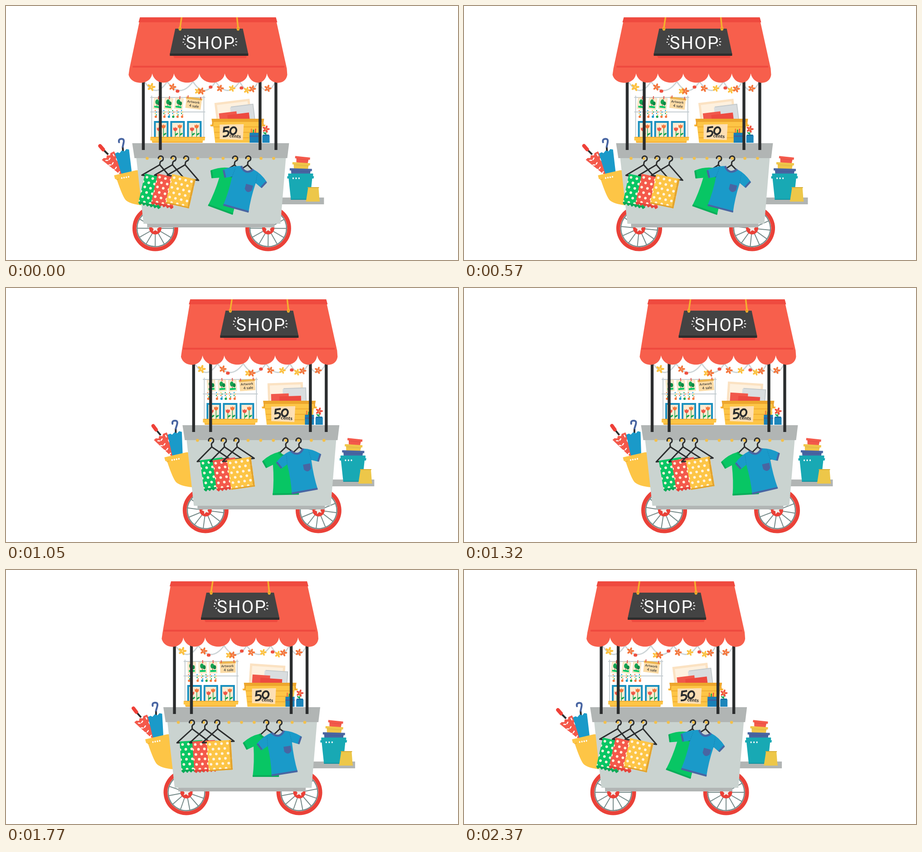
An HTML page with a canvas for the animation above (2.4 s loop, 997 px wide and 561 px high).

```html
<!DOCTYPE html>
<html lang="en">
<head>
<meta charset="utf-8">
<title>Shop cart</title>
<style>
html, body { margin: 0; width: 100%; height: 100%; overflow: hidden; background: #fff; }
canvas { display: block; width: 997px; height: 561px; }
</style>
</head>
<body>
<canvas id="stage" width="997" height="561"></canvas>
<script>
const ctx = document.getElementById('stage').getContext('2d');
const LOOP = 2400, STEP = 30, TAU = Math.PI * 2, DEG = Math.PI / 180;
const C = {
  roof: '#f75f4c', roofDark: '#ef4a3f', black: '#2b2d2e', grey: '#b1b5b4', body: '#cad3d0',
  yellow: '#fdc546', amber: '#eda62d', blue: '#1a9ac9', navy: '#4865a2', green: '#08c664',
  leaf: '#14a452', orange: '#f4763c', cream: '#fdecd3', wheel: '#ea4138', spoke: '#768a89', teal: '#18a9b4'
};

// Cubic ease in and out, centred on a moment.
function ease(t, centre, span) {
  const u = Math.min(1, Math.max(0, (t - centre) / span + 0.5));
  return u < 0.5 ? 4 * u ** 3 : 1 - 4 * (1 - u) ** 3;
}
const sway = (t, out, back, span) => ease(t, out, span) - ease(t, back, span);
const mix = (a, b, k) => a + (b - a) * k;

function trace(points, closed = true) {
  ctx.beginPath();
  for (let i = 0; i < points.length; i += 2) ctx.lineTo(points[i], points[i + 1]);
  if (closed) ctx.closePath();
}
function poly(color, ...points) {
  trace(points);
  ctx.fillStyle = color;
  ctx.fill();
}
function line(color, width, ...points) {
  trace(points, false);
  ctx.strokeStyle = color;
  ctx.lineWidth = width;
  ctx.stroke();
}
function path(d, fill, stroke, width) {
  const p = new Path2D(d);
  if (fill) { ctx.fillStyle = fill; ctx.fill(p); }
  if (stroke) { ctx.strokeStyle = stroke; ctx.lineWidth = width; ctx.stroke(p); }
}
function rect(color, x, y, w, h) {
  ctx.fillStyle = color;
  ctx.fillRect(x, y, w, h);
}
function oval(color, x, y, rx, ry = rx, turn = 0) {
  ctx.fillStyle = color;
  ctx.beginPath();
  ctx.ellipse(x, y, rx, ry, turn, 0, TAU);
  ctx.fill();
}
function ring(color, width, x, y, r) {
  ctx.strokeStyle = color;
  ctx.lineWidth = width;
  ctx.beginPath();
  ctx.arc(x, y, r, 0, TAU);
  ctx.stroke();
}
function text(str, x, y, font, color, spacing = 0) {
  ctx.font = font;
  ctx.fillStyle = color;
  ctx.letterSpacing = spacing + 'px';
  ctx.fillText(str, x, y);
}
function at(x, y, degrees, draw) {
  ctx.save();
  ctx.translate(x, y);
  ctx.rotate(degrees * DEG);
  draw();
  ctx.restore();
}

function blossom(color, x, y, r) {
  for (let i = 0; i < 5; i++) {
    const a = i * TAU / 5 - 1.3;
    oval(color, x + Math.cos(a) * r * 0.6, y + Math.sin(a) * r * 0.6, r * 0.5, r * 0.28, a);
  }
}

function garland() {
  const knots = [305, 355, 412, 462, 515, 556, 594];
  ctx.beginPath();
  ctx.moveTo(knots[0], 167);
  knots.slice(1).forEach((x, i) => ctx.quadraticCurveTo((x + knots[i]) / 2, 206, x, 167));
  ctx.strokeStyle = '#ccd4d6';
  ctx.lineWidth = 2.8;
  ctx.stroke();
  for (const [x, y] of [[378, 188], [451, 179], [519, 181]]) oval('#ef5040', x, y, 4.2, 3.5);
  for (const [x, y] of [[320, 179], [423, 188], [498, 182], [531, 186]]) blossom('#fdc13f', x, y, x % 3 ? 8.5 : 7);
  for (const [x, y] of [[367, 179], [431, 188], [472, 182], [543, 183], [577, 182]]) blossom(C.orange, x, y, 7.5);
}

function artCard(x, turn) {
  at(x, 203, turn, () => {
    rect('#f7dfb4', -8.5, 0, 18, 25);
    rect(C.cream, -7, 1.5, 15, 22);
    oval(C.leaf, -1, 9, 4, 5.5);
    oval('#0c8a45', 4, 12, 3.2, 4.5);
    rect('#6b5434', -1, 13, 1.2, 6);
    rect(C.green, -6, 18, 13, 4);
    line('#e4574b', 2, 1, -4, 1, 3);
  });
}

function tulip(color, x, y) {
  line(C.leaf, 1.4, x, y, x, 289);
  path(`M${x - 4.5} ${y - 5}l2.5 2 2-3 2 3 2.5-2v5q-4.5 7-9 0z`, color);
  oval(C.leaf, x + 3, 283, 3.8, 1.7, -0.6);
}

function rack(tilt) {
  const bar = '#c4ccd0';
  for (const x of [321, 436]) line(bar, 2, x, 198, x, 292);
  for (const y of [202, 234]) line(bar, 2, 318, y, 439, y);
  [335, 359, 382].forEach(x => artCard(x, tilt));
  at(414, 202, tilt, () => {
    rect('#fbdba5', -16, 1, 34, 24);
    rect('#edb650', -17, 0, 36, 4.5);
    line('#e4574b', 2, -13, -3, -13, 3);
    line('#e4574b', 2, 15, -3, 15, 3);
    text('Artwork', -13.5, 12.5, '600 7.2px Lato, sans-serif', C.black, 0.2);
    text('4 sale', -8, 21.5, '600 8px Lato, sans-serif', C.black, 0.2);
  });
  const beads = [C.orange, C.blue, C.yellow, C.leaf];
  [330, 349, 359, 368.5, 378, 388].forEach((x, i) => {
    for (let j = 0; j < 4; j++) oval(beads[(i + j) % 4], x + (j % 2 ? 1.2 : -1.2), 231 + j * 3.2, 1.3);
    oval([C.orange, C.orange, C.blue, C.leaf][i % 4], x, 244.5, 2.6);
  });
  for (const x of [326, 362, 399]) {
    rect('#1990bf', x, 254, 32, 38);
    rect(C.cream, x + 4, 258, 24, 34);
    tulip('#ef5646', x + 11, 273);
    tulip(C.orange, x + 21, 267);
  }
  poly(C.yellow, 318, 289, 439, 289, 438, 297, 434, 297, 433, 302, 322, 302, 321, 297, 318, 297);
  rect(C.amber, 320, 289, 118, 1.5);
  rect(C.amber, 323, 300, 110, 2);
}

function crate(tilt) {
  at(505, 250, tilt, () => {
    rect('#fbe2c2', -41, -41, 78, 48);
    rect('#fef1df', -36, -36, 68, 40);
    rect('#c4cacc', -6, -29, 50, 34);
    rect('#d9dddf', -8, -27, 50, 34);
    rect('#f1584b', -34, -17, 39, 24);
    rect('#ed4a40', -16, -11, 48, 18);
  });
  poly(C.yellow, 455, 250, 567, 250, 560, 302, 461, 302);
  for (let i = 0; i < 3; i++) line(C.amber, 1.4, 457 + i * 2, 267 + i * 12, 564 - i * 2, 267 + i * 12);
  poly(C.amber, 453, 249, 569, 249, 568, 256, 454, 256);
  poly('#fbb93e', 450, 262, 458, 262, 457, 266, 451, 266);
  poly('#fbb93e', 564, 262, 572, 262, 571, 266, 565, 266);
  line(C.amber, 3, 456, 255, 455, 265);
  line(C.amber, 3, 566, 255, 567, 265);
  poly('#fddfb4', 471, 262, 524, 261, 522, 296, 471, 294);
  path('M492 267L481 268.5 480 277Q491 274 490.500 281Q489 289 478 288', null, C.black, 4);
  ctx.beginPath();
  ctx.ellipse(501, 275.500, 6.5, 8, 0.4, 0, TAU);
  ctx.stroke();
  at(492, 290, 4, () => text('cents', 0, 0, '800 10.5px Lato, sans-serif', C.black, 0.1));
}

function pencils() {
  [C.orange, C.leaf, '#ef5040', C.yellow].forEach((c, i) => {
    line(c, 2.5, 541 + i * 4, 284, 541 + i * 4.6, 271 + i % 2 * 2);
  });
  rect('#1a80b7', 537, 280, 20, 22);
  rect('#3d62a0', 537, 286, 20, 3);
}
function vase() {
  line(C.leaf, 1.8, 573, 286, 573, 272);
  oval(C.leaf, 570, 281, 3.5, 1.6, 0.6);
  blossom('#ef5140', 573, 272, 7.5);
  oval(C.yellow, 573, 272, 1.6);
  rect('#1d86bb', 565, 286, 16, 16);
  rect('#176ea5', 566, 284, 14, 3);
}

function wheel(x, roll) {
  at(x, 491, 0, () => {
    ctx.rotate(roll);
    oval('#fff', 0, 0, 46);
    for (let i = 0; i < 12; i++) {
      const a = i * TAU / 12;
      line(C.spoke, 2, 0, 0, Math.cos(a) * 40, Math.sin(a) * 40);
    }
    ring(C.spoke, 2.5, 0, 0, 40.5);
    ring(C.wheel, 8.5, 0, 0, 46.2);
    oval(C.wheel, 0, 0, 13.5);
    const star = [];
    for (let i = 0; i < 10; i++) {
      const r = i % 2 ? 4.2 : 9, a = i * TAU / 10 - TAU / 4;
      star.push(Math.cos(a) * r, Math.sin(a) * r);
    }
    poly('#f3eeea', ...star);
  });
}

function umbrellas(lean) {
  at(265, 385, lean, () => {
    ctx.translate(-265, -385);
    line(C.black, 4, 214, 317, 225, 328);
    ctx.lineCap = 'round';
    line('#ef4038', 8, 207, 309, 214, 317);
    poly('#f4594b', 211, 340, 215, 336, 221, 336, 222, 330, 229, 330, 230, 325, 238, 321, 260, 362, 258, 376, 246, 368);
    for (let i = 0; i < 11; i++) {
      const x = 220 + i % 3 * 9 + Math.floor(i / 3) * 7, y = 341 - i % 3 * 5 + Math.floor(i / 3) * 10;
      const a = i * 2.1;
      if (x < 256) line('#fff', 2.4, x, y, x + Math.cos(a) * 4, y + Math.sin(a) * 4);
    }
    ctx.lineCap = 'butt';
    line(C.black, 4, 257, 311, 258, 324);
    ctx.lineCap = 'round';
    path('M249 301Q247 294 254 293.500Q261 293 259 302L257 311', null, C.navy, 4);
    ctx.lineCap = 'butt';
    poly(C.blue, 240, 326, 246, 323, 250, 325, 255, 319, 261, 321, 265, 316, 271, 317, 278, 376, 256, 376);
  });
}

function sideBasket() {
  path('M238 374L286 363 300 362V440Q274 438 264 429Q257 422 244 383L240 382z', C.yellow);
  line(C.amber, 1.2, 243, 384, 249, 382);
  for (let i = 0; i < 4; i++) oval('#fff', 255 + i * 5, 380 - i * 0.9, 1.5, 2);
}

function bowl(color, x, y, w, turn) {
  at(x, y, turn, () => {
    poly(color, -w / 2, 0, w / 2, 0, w / 2, 5, w / 2 - 3, 5, w / 2 - 4, 14, 4 - w / 2, 14, 3 - w / 2, 5, -w / 2, 5);
    rect('rgba(0,0,0,.07)', 3 - w / 2, 5, w - 6, 1.5);
  });
}
function buckets() {
  bowl('#f4594b', 654, 333, 33, 6);
  bowl('#f0c649', 651, 346, 39, 4);
  bowl(C.navy, 650, 359, 49, 2);
  poly(C.teal, 622, 370, 677, 370, 677, 376, 679, 376, 678, 381, 675, 381, 670, 428, 628, 428, 623, 381, 620, 381, 620, 376, 622, 376);
  rect('#14929f', 628, 426, 42, 2);
  for (let i = 0; i < 3; i++) oval('#fff', 633 + i * 6.5, 380.500, 1.5, 2);
  poly('#edc749', 666, 401, 689, 401, 691, 427, 692, 432, 661, 432, 662, 427);
  rect('#d9ae38', 665, 400, 25, 2);
}

function hanger() {
  ctx.beginPath();
  ctx.arc(0, 0, 5.5, Math.PI, Math.PI * 2.4);
  ctx.lineTo(0, 8);
  ctx.lineTo(0, 14);
  ctx.strokeStyle = C.black;
  ctx.lineWidth = 3;
  ctx.lineJoin = ctx.lineCap = 'round';
  ctx.stroke();
  trace([0, 14, 35, 43, -35, 43]);
  ctx.stroke();
  ctx.lineJoin = 'miter';
  ctx.lineCap = 'butt';
}

function towel(x, color, edge, left, width, jagged, angle) {
  at(x, 337, angle, () => {
    hanger();
    ctx.translate(0, 43);
    ctx.rotate(angle * 0.35 * DEG);
    const right = left + width, outline = [left, -3, right, -3, right, 63];
    if (jagged) for (let i = 0; i <= 12; i++) outline.push(right - i * width / 12, i % 2 ? 67 : 63);
    else outline.push(left, 63);
    ctx.save();
    trace(outline);
    ctx.fillStyle = color;
    ctx.fill();
    ctx.clip();
    for (let row = 0; row < 6; row++) {
      for (let col = 0; col < 6; col++) oval('#fff3dc', left + 6 + col * 13 - row % 2 * 6.5, 4 + row * 11, 2.9);
    }
    rect(edge, left, 60, width, 8);
    if (!jagged) rect(edge, right - 4, -3, 4, 70);
    ctx.restore();
  });
}

function shirt(x, dx, dy, angle, swing, color, trim, pocket) {
  at(x, 337, swing * 0.4, hanger);
  at(x + dx, 337 + dy, angle, () => {
    path('M-14-3Q-33 1-50 16L-42 32-27 25Q-25 60-29 91H29Q25 60 27 25L42 32 50 16Q33 1 14-3Q0 15-14-3z', color);
    path('M-14-3Q0 15 14-3', null, trim, 4.5);
    line(trim, 4, -49, 16, -41, 31);
    line(trim, 4, 49, 16, 41, 31);
    rect(trim, -29, 88, 58, 4);
    if (pocket) {
      path('M7 32H23V43Q15 54 7 43z', trim);
      ctx.setLineDash([2, 2]);
      line('#187fae', 1, -27, 25, -25, 4);
      line('#187fae', 1, 27, 25, 25, 4);
      ctx.setLineDash([]);
    }
  });
}

function roof(tuck) {
  const left = 270 + tuck;
  const cusps = [322, 370, 426, 482, 533, 575, 620];
  ctx.beginPath();
  ctx.moveTo(294, 34);
  ctx.lineTo(596, 34);
  ctx.lineTo(619, 138);
  ctx.lineTo(620, 152);
  let x = 620;
  for (const next of [...cusps.slice(0, -1).reverse(), left]) {
    ctx.bezierCurveTo(x - 3, 176, next + 6, 176, next, next === left ? 152 : 149);
    x = next;
  }
  ctx.lineTo(left + 2, 138);
  ctx.closePath();
  ctx.fillStyle = C.roof;
  ctx.fill();
  poly(C.roofDark, 295, 25, 595, 25, 598, 36, 292, 36);
  rect(C.roofDark, 279, 132, 335, 4);
}

function sign() {
  poly(C.roofDark, 368, 109, 531, 109, 529, 115, 371, 115);
  poly('#434343', 373, 50, 522, 50, 534, 106, 361, 106);
  rect('#2d2d2d', 361, 105, 173, 5);
  for (const [a, b] of [[387, 383.500], [509, 511.500]]) {
    line('#f5b02e', 3.5, a, 25, b, 48);
    oval('#f5b02e', b, 50, 3.2, 4.5);
    oval('#d98e1c', b, 50, 1.2, 2);
  }
  text('SHOP', 396, 95, '400 38.5px Roboto, sans-serif', '#fff', 2.2);
  ctx.lineCap = 'round';
  for (const [x, y, dx, dy] of [[391, 73, 2, 1], [390, 80, 1, 0], [394, 66, 1, 2], [401, 65, 0, 1], [394, 85, 1, -1],
    [506, 73, 1, -1], [507, 79, 2, 0], [506, 85, 2, 1], [501, 87, 1, 1]]) line('#fff', 2.2, x, y, x + dx, y + dy);
  ctx.lineCap = 'butt';
}

function draw(t) {
  const drive = 113 * (ease(t, 566, 1400) - ease(t, 1821, 1270));
  const slide = sway(t, 850, 1930, 900);
  const lag = sway(t, 830, 1860, 900);
  const paper = sway(t, 1060, 2040, 800);
  const cloth = mix(9.5, -7, lag);
  const tilt = mix(15.5, -13, slide);
  const shifted = (dx, fn) => at(dx * slide, 0, 0, fn);

  rect('#fff', 0, 0, 997, 561);
  ctx.save();
  ctx.translate(drive, 0);

  garland();
  shifted(5.5, () => rack(mix(7, -5, lag)));
  shifted(3, () => crate(mix(-7, 4, paper)));
  shifted(12, pencils);
  shifted(7, vase);

  wheel(329, drive / 50);
  wheel(578, drive / 50);
  umbrellas(5 * lag);
  sideBasket();
  rect(C.grey, 600, 423, 101, 15);
  shifted(5, buckets);

  rect(C.grey, 311, 480, 281, 9);
  poly(C.body, 287, 335, 617, 335, 605, 481, 303, 481);
  poly(C.grey, 278, 303, 624, 303, 620, 336, 283, 336);
  for (const x of [302.500, 340, 560, 595]) rect(C.black, x - 3.2, 160, 6.4, 158);
  for (let i = 0; i < 11; i++) oval('#f3c04b', 311 + i * 27.9, 336.500, 3.3);

  towel(341, C.green, '#0aa957', -29, 50, true, cloth);
  towel(369, '#f4594b', '#e5443b', -29, 50, true, cloth);
  towel(397, C.yellow, '#e2a32e', -25, 53, false, cloth);
  shirt(505, -1, 28, tilt * 0.82 + 7.5, tilt, C.green, '#0bae5a', false);
  shirt(534, -3, 23, tilt, tilt, C.blue, C.navy, true);

  roof(5 * slide);
  sign();
  ctx.restore();
}

function frame() {
  const t = performance.now() % LOOP;
  draw(Math.floor(t / STEP) * STEP);
  requestAnimationFrame(frame);
}
frame();
</script>
</body>
</html>
```
